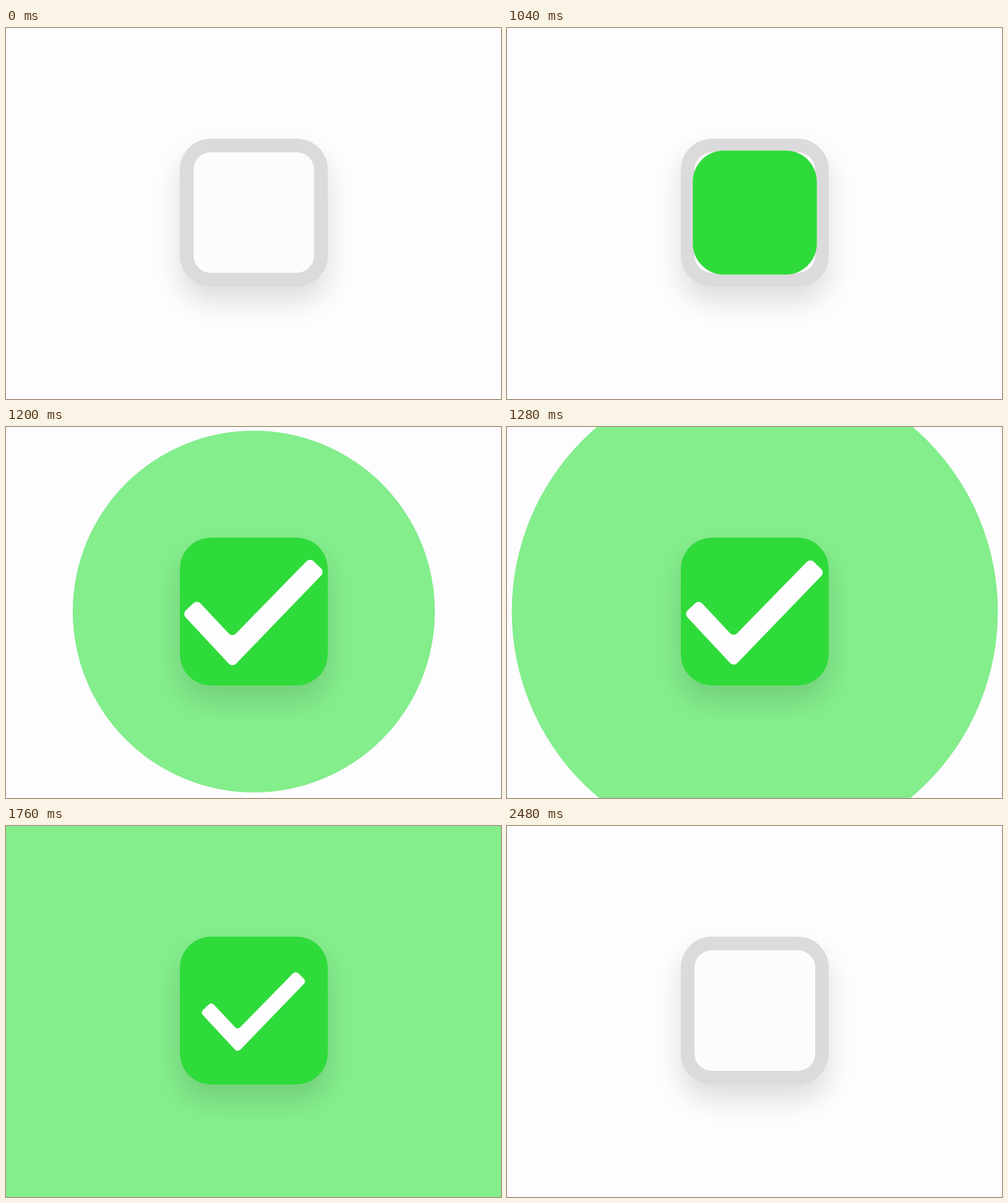
Recreate the animation shown at these times as an HTML page with a canvas. Size 800 px wide and 600 px high, loop 2.52 s.

```html
<!DOCTYPE html>
<html lang="en">
<head>
<meta charset="utf-8">
<title>Checkbox</title>
<style>
  html, body { margin: 0; width: 100%; height: 100%; overflow: hidden; background: #fdfcff; }
  canvas { display: block; }
</style>
</head>
<body>
<canvas id="stage" width="800" height="600"></canvas>
<script>
const ctx = document.getElementById('stage').getContext('2d');
const LOOP = 2520, STEP = 40, RESET = 2480;
const CX = 400.5, CY = 298.5, SIZE = 239, RADIUS = 50;

// Corners of the tick at its largest, relative to its centre
const TICK = [[-115, 2], [-91, -20.7], [-34, 40], [91.5, -88.6], [115.3, -65.7], [-34, 89]];

const progress = (t, from, to) => Math.min(1, Math.max(0, (t - from) / (to - from)));
const smooth = u => u * u * (3 - 2 * u);
const outCubic = u => 1 - (1 - u) ** 3;

function square(size, radius, y, color) {
  ctx.fillStyle = color;
  ctx.beginPath();
  ctx.roundRect(CX - size / 2, y - size / 2, size, size, Math.min(radius, size / 2));
  ctx.fill();
}

function wave(t) {
  const r = 519 * outCubic(progress(t, 1056, 1652));
  if (!r) return;
  ctx.fillStyle = '#84ed8c';
  ctx.beginPath();
  ctx.arc(CX, CY, r, 0, Math.PI * 2);
  ctx.fill();
}

function box(t) {
  const press = smooth(progress(t, 680, 860)) - smooth(progress(t, 860, 1040));
  const y = CY + 7 * press;

  ctx.save();
  ctx.shadowColor = `rgba(0, 0, 0, ${0.13 - 0.05 * press})`;
  ctx.shadowOffsetY = 24 - 14 * press;
  ctx.shadowBlur = 44 - 16 * press;
  square(SIZE, RADIUS, y, '#dbdadc');
  ctx.restore();

  square(195, 28, y, '#fcfbfe');
  const fill = SIZE * smooth(progress(t, 920, 1081));
  if (fill) square(fill, RADIUS, y, '#2fdb3a');
}

function tick(t) {
  const k = smooth(progress(t, 1040, 1200)) * (1 - 0.258 * smooth(progress(t, 1200, 1800)));
  if (!k) return;
  ctx.save();
  ctx.translate(399.8, 300);
  ctx.scale(k, k);
  ctx.fillStyle = '#fefdff';
  ctx.beginPath();
  ctx.moveTo(-103, -9.35);
  for (let i = 1; i <= TICK.length; i++) {
    const corner = TICK[i % TICK.length], next = TICK[(i + 1) % TICK.length];
    ctx.arcTo(...corner, ...next, 8);
  }
  ctx.closePath();
  ctx.fill();
  ctx.restore();
}

function draw(time) {
  let t = Math.floor((time % LOOP) / STEP) * STEP;
  if (t >= RESET) t = 0;
  ctx.fillStyle = '#fdfcff';
  ctx.fillRect(0, 0, 800, 600);
  wave(t);
  box(t);
  tick(t);
  ctx.fillStyle = 'rgba(0, 0, 0, 0.03)';
  ctx.fillRect(0, 599, 800, 1);
}

const start = performance.now();
function frame() {
  draw(performance.now() - start);
  requestAnimationFrame(frame);
}
frame();
</script>
</body>
</html>
```
